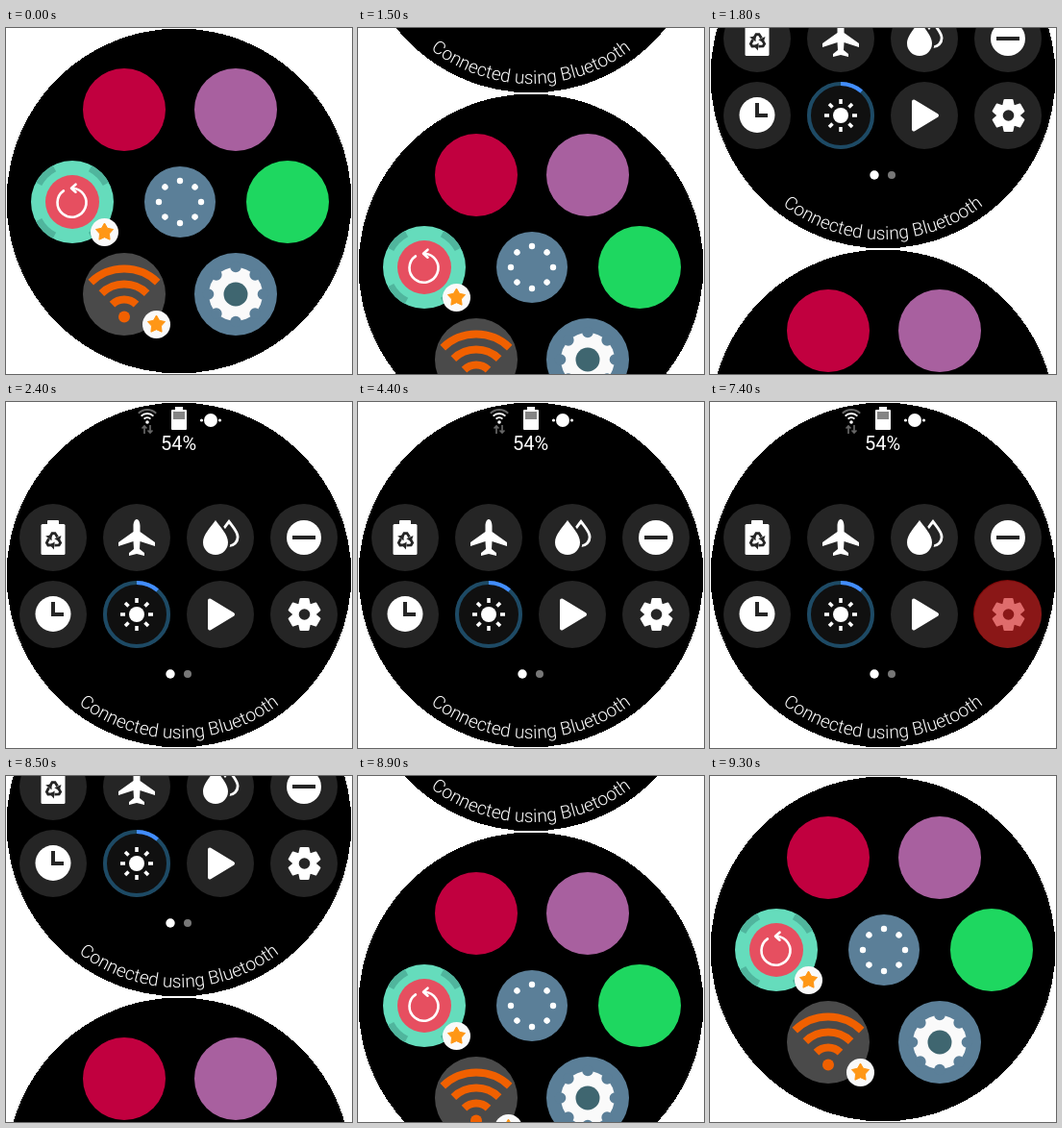
An HTML page that plays this animation: 360 by 360 pixels, repeating every 9320 ms.

```html
<!DOCTYPE html>
<html lang="en">
<head>
<meta charset="utf-8">
<title>Watch quick panel</title>
<style>
html, body { margin: 0; width: 100%; height: 100%; overflow: hidden; background: #fff; }
svg { display: block; width: 100vw; height: 100vh; }
text { font-family: Roboto, "Noto Sans", sans-serif; fill: #fff; text-anchor: middle; }
</style>
</head>
<body>
<svg id="stage" viewBox="0 0 360 360"></svg>
<script>
const LOOP = 9320, SLIDE = 360;
const DARK = '#252525', STEEL = '#5b7f98';

const circle = (x, y, r, fill, more = '') =>
  `<circle cx="${x}" cy="${y}" r="${r}" fill="${fill}" ${more}/>`;
const rect = (x, y, w, h, fill, rx = 0) =>
  `<rect x="${x}" y="${y}" width="${w}" height="${h}" rx="${rx}" fill="${fill}"/>`;
const path = (d, fill, more = '') => `<path d="${d}" fill="${fill}" ${more}/>`;
const line = (d, color, width, more = '') =>
  path(d, 'none', `stroke="${color}" stroke-width="${width}" ${more}`);
const at = (x, y, body, more = '') =>
  `<g transform="translate(${x} ${y}) ${more}">${body}</g>`;
const spin = (n, body) => Array.from({ length: n }, (_, i) =>
  `<g transform="rotate(${i * 360 / n})">${body}</g>`).join('');

// Point on a circle; zero degrees is straight up, clockwise.
const polar = (r, deg) => {
  const a = (deg - 90) * Math.PI / 180;
  return `${(r * Math.cos(a)).toFixed(2)} ${(r * Math.sin(a)).toFixed(2)}`;
};
const arc = (r, from, to) =>
  `M${polar(r, from)}A${r} ${r} 0 ${to - from > 180 ? 1 : 0} 1 ${polar(r, to)}`;

const disc = circle(180, 180, 179.4, '#000', 'shape-rendering="crispEdges"');

function badge(x, y) {
  const pts = Array.from({ length: 10 }, (_, i) => polar(i % 2 ? 5.2 : 9.5, i * 36));
  return at(x, y, circle(0, 0, 14.5, '#fafafa') +
    path(`M${pts.join('L')}Z`, '#ff9716', 'stroke="#ff9716" stroke-linejoin="round"'));
}

function refreshApp() {
  return circle(0, 0, 43, '#65dcbc') +
    spin(4, line(arc(39.5, 28, 62), '#50b59d', 7)) +
    circle(0, 0, 28, '#e64f60') +
    at(-.5, .7, line(arc(15, 4, 325), '#fff', 2.6, 'stroke-linecap="round"') +
      line('M4 -19L-.5 -15L4 -11', '#fff', 2.6, 'stroke-linecap="round" stroke-linejoin="round"'));
}

function wifiApp() {
  const waves = [18, 34, 50].map(r => line(arc(r, -44, 44), '#f06000', 8)).join('');
  return circle(0, 0, 43, '#4a4a4a') + at(0, 23.5, circle(0, 0, 6, '#f06000') + waves);
}

function gearApp() {
  return circle(0, 0, 43, STEEL) + circle(0, 0, 28, '#fafafa') +
    spin(8, circle(0, -28.5, 5.8, STEEL)) + circle(0, 0, 12.5, '#3f6670');
}

const apps = disc +
  circle(123, 85, 43, '#c1003f') +
  circle(239, 85, 43, '#a8609f') +
  at(69, 181, refreshApp()) + badge(102.5, 212.5) +
  at(181, 181, circle(0, 0, 37, STEEL) + spin(8, circle(0, -22, 3.2, '#fff'))) +
  circle(293, 181, 43, '#1ed760') +
  at(123, 277, wifiApp()) + badge(156.5, 308.5) +
  at(239, 277, gearApp());

const drop = 'M0 -18C5 -11 13 -3 13 5A13 13 0 0 1 -13 5C-13 -3 -5 -11 0 -18Z';
const plane = 'M0 -19C2.5 -19 3.5 -15 3.5 -12V-6L19 5V9L3.5 4L3 12L8 16V19L0 17' +
  'L-8 19V16L-3 12L-3.5 4L-19 9V5L-3.5 -6V-12C-3.5 -15 -2.5 -19 0 -19Z';

const recycle = spin(3,
  line('M-3.6 -3.6L-1.5 -7.4H1.5L4 -3.4', DARK, 2.8) + path('M8 -5L6 1.2L.8 -1.8Z', DARK));

const tooth = path('M-5.5 -9L-4 -16H4L5.5 -9Z', '#fff', 'stroke="#fff" stroke-width="2" stroke-linejoin="round"');

const icons = [
  rect(-12.5, -14, 25, 32, '#fff', 1.5) + rect(-6, -18, 12, 6, '#fff', 1) + at(.5, 3, recycle),
  path(plane, '#fff'),
  at(9, -4, path(drop, DARK, 'stroke="#fff" stroke-width="4"'), 'scale(.7)') +
    at(-5, 0, path(drop, '#fff', `stroke="${DARK}" stroke-width="5" paint-order="stroke"`)),
  circle(0, 0, 18, '#fff') + rect(-12, -2, 24, 4, DARK),
  circle(0, -.5, 18.5, '#fff') + line('M0 -13V0H11', DARK, 4),
  circle(0, 0, 33, '#101010', 'stroke="#1d4a65" stroke-width="4"') +
    line(arc(33, 0, 41), '#428dff', 4) +
    circle(0, 0, 8, '#fff') + spin(8, line('M0 -12V-17', '#fff', 3.5)),
  path('M-11 -14.5L13 0L-11 14.5Z', '#fff', 'stroke="#fff" stroke-width="4" stroke-linejoin="round"'),
  at(.5, 0, circle(0, 0, 12.5, '#fff') + spin(6, tooth) + circle(0, 0, 5.8, DARK))
];

const buttons = icons.map((icon, i) =>
  at(49 + i % 4 * 87, i < 4 ? 141 : 221, circle(0, 0, 35, DARK) + icon)).join('');

const wifiStatus = at(147, 21,
  circle(0, 0, 1.8, '#fff') +
  line(arc(4.8, -45, 45), '#fff', 2) +
  line(arc(9, -45, 45), '#fff', 2) +
  line(arc(13, -45, 45), '#666', 2) +
  line('M-3 12V4M-5.5 6.5L-3 4L-.5 6.5M3 3V11M.5 8.5L3 11L5.5 8.5', '#666', 1.7));

const battery = rect(176, 5, 8, 4, '#fff') + rect(172, 8, 16, 21, '#fff', 1) +
  rect(174, 10, 12, 8, '#858585');

const linkStatus = circle(213, 19, 7, '#fff') +
  circle(203.5, 19, 1.6, '#fff') + circle(222.5, 19, 1.6, '#fff');

const panel = disc + wifiStatus + battery + linkStatus +
  '<text x="179.5" y="50" font-size="20">54%</text>' + buttons +
  circle(171, 283, 4.7, '#fff') + circle(189, 283, 4, '#777') +
  '<path id="rim" d="M10 180A170 170 0 0 0 350 180" fill="none"/>' +
  '<text font-size="19" font-weight="300"><textPath href="#rim" startOffset="50%">Connected using Bluetooth</textPath></text>' +
  circle(309.5, 220.5, 35.5, '#cb1010', 'id="tap" opacity=".61"');

const stage = document.getElementById('stage');
stage.innerHTML = `<g id="apps">${apps}</g><g id="panel">${panel}</g>`;
const [appsPage, panelPage, tap] = ['apps', 'panel', 'tap'].map(id => document.getElementById(id));

// Ten 100 ms steps along a quadratic ease-out.
function glide(t, start) {
  const k = Math.max(0, Math.min(10, Math.floor((t - start) / 100) + 1));
  return 1 - (1 - k / 10) ** 2;
}

function draw(t) {
  const y = Math.round(SLIDE * (glide(t, 1500) - glide(t, 8400)));
  appsPage.setAttribute('transform', `translate(0 ${y})`);
  panelPage.setAttribute('transform', `translate(0 ${y - SLIDE})`);
  const lit = t >= 3400 && t < 8400 && Math.floor((t - 3400) / 1000) % 2 === 0;
  tap.setAttribute('visibility', lit ? 'visible' : 'hidden');
}

const begin = performance.now();
function tick() {
  draw((performance.now() - begin) % LOOP);
  requestAnimationFrame(tick);
}
tick();
</script>
</body>
</html>
```
